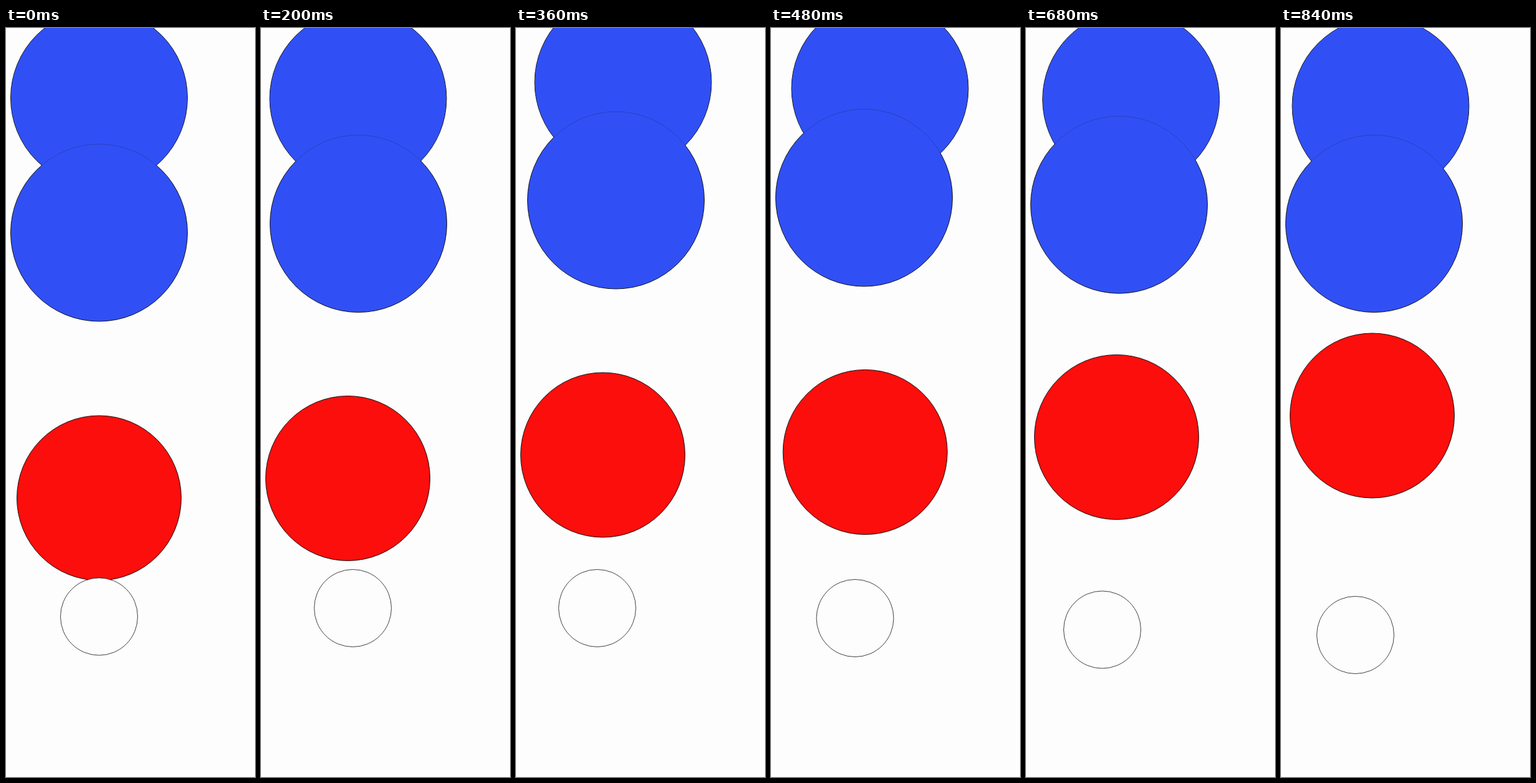
An HTML page for the animation above (880 ms loop, 400 px wide and 1200 px high).

```html
<!DOCTYPE html>
<html lang="en">
<head>
<meta charset="utf-8">
<title>Drifting circles</title>
<style>
  html, body { margin: 0; width: 100%; height: 100%; overflow: hidden; background: #fdfdfd; }
  svg { display: block; width: 100%; height: 100%; }
  .line { stroke: #111; stroke-width: 1; }
  .blue { fill: #3050f6; }
</style>
</head>
<body>
<svg viewBox="0 0 400 1200">
  <circle id="top" class="blue line" r="142"/>
  <circle id="mid" class="blue line" r="142"/>
  <circle id="blend" class="blue" r="141.5" opacity=".75"/>
  <circle id="red" class="line" r="132" fill="#fc0e0c"/>
  <circle id="ring" class="line" r="62" fill="#fdfdfd" stroke-opacity=".8"/>
</svg>
<script>
const LOOP = 880, STEP = 40;
const START_X = 149.5;

// Waypoints of each drift: [time, x, y]
const drifts = {
  top: [[0, START_X, 112], [200, 156, 113], [360, 172, 87], [480, 175, 97], [600, 173, 109], [840, 160, 125]],
  mid: [[0, START_X, 328], [200, 156.5, 313.5], [360, 160.5, 276], [480, START_X, 272], [600, START_X, 268], [840, START_X, 313.5]],
  red: [[0, START_X, 753], [200, 139.5, 721.5], [360, 139.5, 684], [600, 163, 675], [680, 145.5, 655.5], [840, 146.5, 621]],
  ring: [[0, START_X, 943], [200, 147.5, 929.5], [360, 130.5, 929.5], [480, 135, 945.5], [680, 122.5, 964], [840, 119.5, 972.5]]
};
drifts.blend = drifts.top;

function at(path, t) {
  const next = Math.max(1, path.findIndex(p => p[0] >= t));
  const [t0, x0, y0] = path[next - 1];
  const [t1, x1, y1] = path[next];
  const k = (t - t0) / (t1 - t0);
  return [x0 + (x1 - x0) * k, y0 + (y1 - y0) * k];
}

function draw(ms) {
  const t = Math.floor((ms % LOOP) / STEP) * STEP;
  for (const id in drifts) {
    const [x, y] = at(drifts[id], t);
    const circle = document.getElementById(id);
    circle.setAttribute("cx", x);
    circle.setAttribute("cy", y);
  }
}

let start;
function tick(now) {
  start ??= now;
  draw(now - start);
  requestAnimationFrame(tick);
}
draw(0);
requestAnimationFrame(tick);
</script>
</body>
</html>
```
